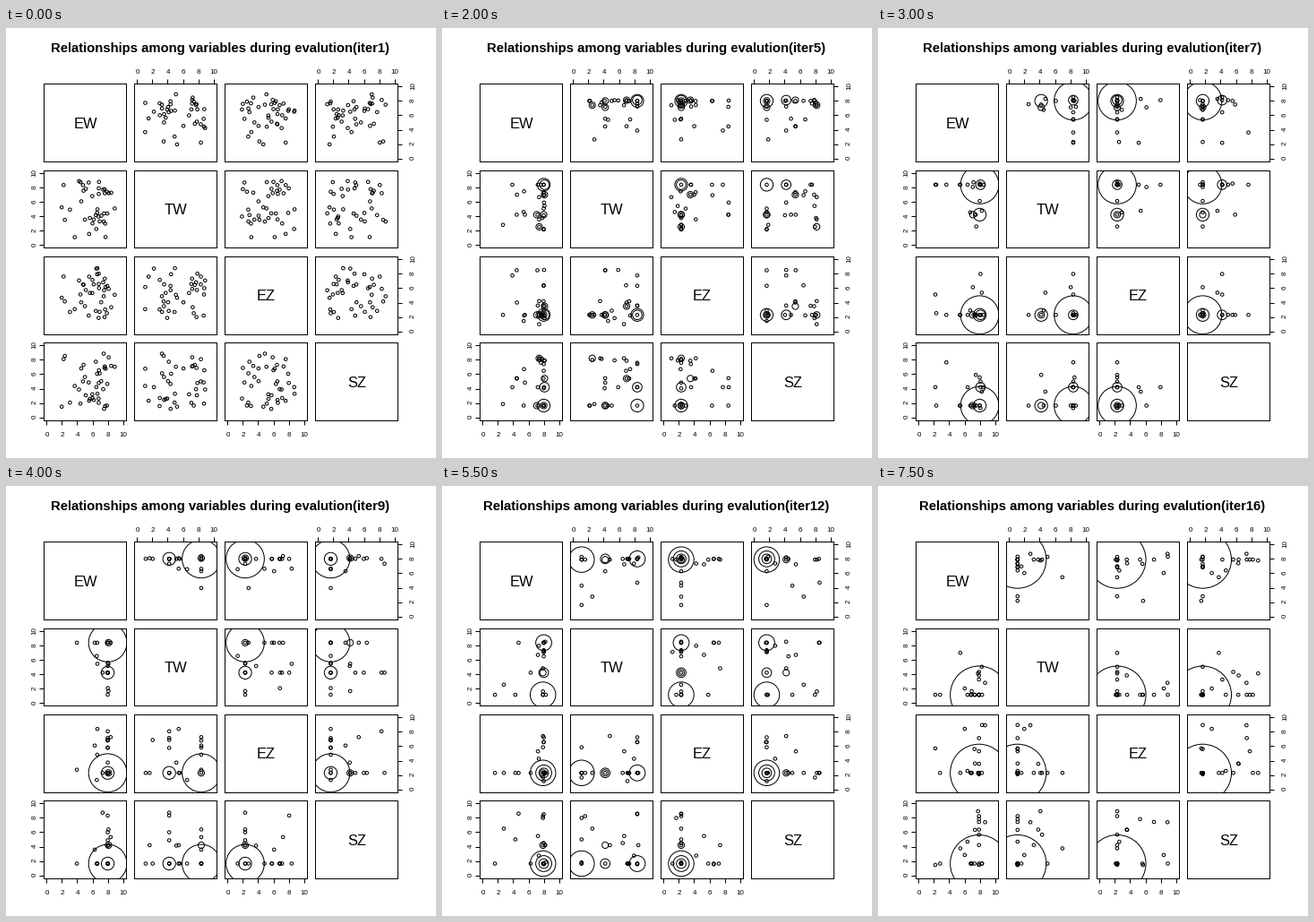
These frames come from a looping animation (480 px wide and 480 px high, 8 s). A matplotlib script:

```python
import numpy as np
import matplotlib.pyplot as plt
from matplotlib.animation import FuncAnimation

SIZE, DPI = 480, 80
PX = 72 / DPI                      # points per pixel
GENERATIONS, INTERVAL = 16, 500
NAMES = ("EW", "TW", "EZ", "SZ")
LEFT, TOP, STEP_X, STEP_Y = 42.77, 61.78, 100.99, 96.24
BOX_W, BOX_H = 91.49, 86.74
UNIT_RADIUS = 1.78
POPULATION = 40

# Dominant genomes, each with (generation, copies) keys.
ELITES = [
    ((8.0, 8.4, 2.3, 1.65), [(3, 0), (6, 6), (7, 12), (8, 12), (10, 11),
                             (12, 5), (15, 0)]),
    ((8.0, 4.2, 2.3, 1.65), [(4, 0), (5, 2), (7, 4), (10, 4), (12, 3), (15, 0)]),
    ((7.9, 1.1, 2.3, 1.65), [(9, 0), (10, 1), (12, 8), (16, 18)]),
    ((8.1, 8.4, 2.3, 4.2), [(1, 0), (3, 3), (7, 3), (10, 2), (11, 0)]),
    ((8.0, 8.5, 2.8, 4.9), [(1, 0), (3, 3), (5, 0)]),
    ((5.6, 2.1, 3.5, 2.1), [(1, 0), (3, 2), (5, 0)]),
    ((8.1, 7.0, 3.5, 5.4), [(4, 0), (5, 2), (6, 0)]),
    ((7.4, 2.5, 2.3, 8.2), [(3, 0), (5, 2), (6, 0)]),
    ((7.1, 4.2, 2.3, 1.65), [(4, 0), (5, 2), (7, 2), (8, 0)]),
    ((7.9, 1.1, 2.3, 8.8), [(9, 0), (10, 2), (11, 0)]),
    ((7.9, 4.2, 2.3, 4.2), [(10, 0), (12, 2), (13, 0)]),
]

plt.rcParams["font.family"] = "Liberation Sans"


def breed(gen):
    """Points and copy counts: the elites, then mutants up to full size."""
    rng = np.random.default_rng(gen)
    genomes = np.array([genes for genes, _ in ELITES])
    copies = np.array([np.round(np.interp(gen, *zip(*keys)))
                       for _, keys in ELITES])
    alive = copies > 0
    amount = int(POPULATION - copies.sum())

    odds = copies / copies.sum() if alive.any() else None
    kids = genomes[rng.choice(len(genomes), amount, p=odds)]
    fresh = rng.uniform(1, 9, kids.shape)
    fresh[:, 0] = rng.triangular(1, 8, 9, amount)

    # Everything is random at first; later only a gene or two changes.
    change = rng.random(kids.shape) < 0.2 + 0.8 / gen ** 1.2
    change[np.arange(amount), rng.integers(0, 4, amount)] = True
    kids = np.where(change, fresh, kids)

    return (np.vstack([genomes[alive], kids]),
            np.concatenate([copies[alive], np.ones(amount)]))


fig = plt.figure(figsize=(SIZE / DPI, SIZE / DPI), dpi=DPI, facecolor="white")


def label(x, y, text, size, **kw):
    return fig.text(x / SIZE, 1 - y / SIZE, text, fontsize=size * PX,
                    ha="center", va="baseline", rotation_mode="anchor", **kw)


def panel(row, col):
    x0, x1 = (int(LEFT + col * STEP_X + w) for w in (0, BOX_W))
    y0, y1 = (int(TOP + row * STEP_Y + h) + 1 for h in (0, BOX_H))
    ax = fig.add_axes([x0 / SIZE, 1 - y1 / SIZE,
                       (x1 - x0) / SIZE, (y1 - y0) / SIZE])
    ax.set(xlim=(-0.4, 10.4), ylim=(-0.4, 10.4),
           xticks=range(0, 11, 2), yticks=range(0, 11, 2))
    ax.patch.set_visible(False)
    for spine in ax.spines.values():
        spine.set_linewidth(PX)
    ax.tick_params(length=4.75 * PX, width=PX,
                   labelleft=False, labelbottom=False,
                   top=row == 0 and col % 2 == 1,
                   bottom=row == 3 and col % 2 == 0,
                   left=col == 0 and row % 2 == 1,
                   right=col == 3 and row % 2 == 0)
    if row == col:
        label(LEFT + col * STEP_X + BOX_W / 2, 112 + row * STEP_Y,
              NAMES[row], 16.5)
        return None
    return ax.scatter([], [], facecolors="none", edgecolors="black",
                      linewidths=PX, snap=False)


panels = {(r, c): panel(r, c) for r in range(4) for c in range(4)}

for k in range(4):
    for v in range(0, 11, 2):
        x = LEFT + k * STEP_X + (v + 0.4) * BOX_W / 10.8
        y = TOP + k * STEP_Y + BOX_H - (v + 0.4) * BOX_H / 10.8
        label(x, 51 if k % 2 else 456, str(v), 8)
        label(33.5 if k % 2 else 456, y, str(v), 8, rotation=90)

title = label(238.8, 27, "", 14.9, weight="bold")
populations = [breed(gen) for gen in range(1, GENERATIONS + 1)]


def update(i):
    points, counts = populations[i]
    title.set_text(f"Relationships among variables during evalution(iter{i + 1})")
    sizes = (2 * UNIT_RADIUS * counts * PX) ** 2
    for (row, col), dots in panels.items():
        if dots is not None:
            dots.set_offsets(points[:, [col, row]])
            dots.set_sizes(sizes, DPI)
    return [title]


anim = FuncAnimation(fig, update, frames=GENERATIONS, interval=INTERVAL,
                     repeat=True, repeat_delay=0, blit=False)
plt.show()
```
